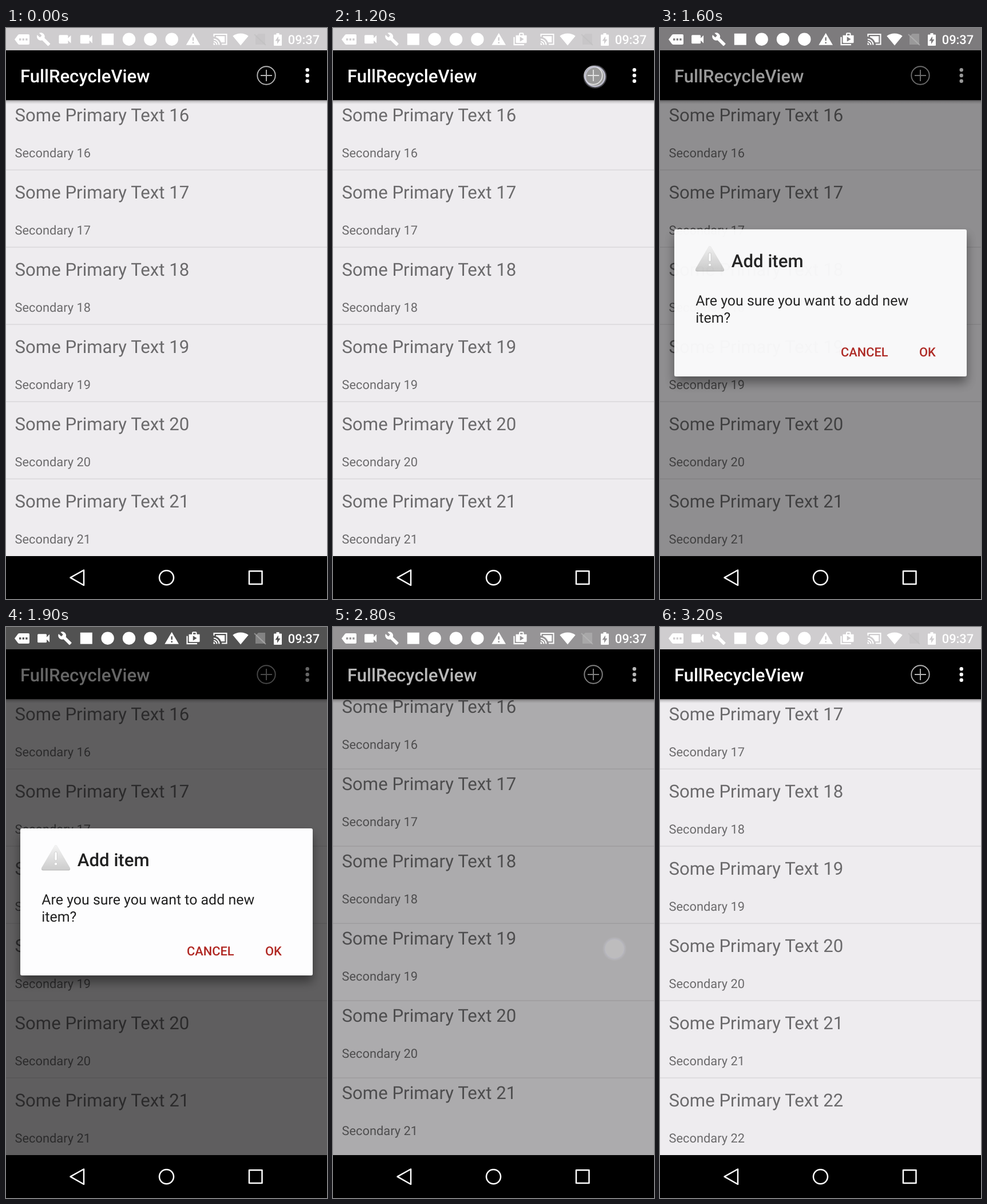
Write an HTML page that moves like this. It is 561x998 px and loops after 5100 ms.

```html
<!DOCTYPE html>
<html lang="en">
<head>
<meta charset="utf-8">
<title>List with add dialog</title>
<style>
  html, body { margin: 0; width: 100%; height: 100%; overflow: hidden; background: #000; }
  svg { display: block; width: 100%; height: 100%; }
  text { font-family: Roboto, sans-serif; text-rendering: geometricPrecision; white-space: pre; }
  .big { font-size: 31.17px; }
  .mid { font-size: 24.93px; }
  .small { font-size: 21.82px; }
  .medium { font-weight: 500; }
</style>
</head>
<body>
<svg viewBox="0 0 561 998">
  <defs>
    <linearGradient id="barShade" x2="0" y2="1">
      <stop stop-color="#000" stop-opacity=".42"/>
      <stop offset=".4" stop-color="#000" stop-opacity=".14"/>
      <stop offset="1" stop-color="#000" stop-opacity="0"/>
    </linearGradient>
    <linearGradient id="alertFill" x2="0" y2="1">
      <stop stop-color="#f2f2f2"/>
      <stop offset="1" stop-color="#cfcfcf"/>
    </linearGradient>
    <filter id="lift" x="-15%" y="-20%" width="130%" height="150%">
      <feDropShadow dx="0" dy="11" stdDeviation="9" flood-color="#000" flood-opacity=".42"/>
    </filter>
    <clipPath id="listArea"><path d="M0 126H561V923H0z"/></clipPath>

    <!-- Status icons, centred on 0,0 -->
    <g id="more"><path fill-rule="evenodd" d="M-13 0L-7-8Q-6-9-4.500-9H11Q13-9 13-7V7Q13 9 11 9H-4.500Q-6 9-7 8zM-5-1.700h3.400v3.400H-5zM.6-1.700H4v3.400H.6zM6.200-1.700h3.400v3.400H6.200z"/></g>
    <g id="camera"><path d="M-9-7.500H4Q5.500-7.500 5.500-6V-2L10.500-7V7L5.500 2V6Q5.500 7.500 4 7.500H-9Q-10.500 7.500-10.500 6V-6Q-10.500-7.500-9-7.500z"/></g>
    <g id="wrench"><path transform="scale(1.06) translate(-12 -12)" d="M22.700 19l-9.100-9.100c.9-2.300.4-5-1.500-6.900-2-2-5-2.400-7.400-1.300L9 6 6 9 1.600 4.700C.4 7.100.9 10.100 2.900 12.100c1.900 1.900 4.600 2.400 6.900 1.500l9.100 9.100c.4.4 1 .4 1.400 0l2.300-2.300c.5-.4.5-1.100.1-1.400z"/></g>
    <g id="block"><path d="M-10.500-10h21v20h-21z"/></g>
    <g id="disc"><circle r="11.200"/></g>
    <g id="warn"><path fill-rule="evenodd" d="M0-11L12.300 10H-12.300zM-1.200-3.500V2.500H1.200V-3.500zM-1.200 4.800V7.200H1.200V4.800z"/></g>
    <g id="bag">
      <path d="M-10.500-4V9.500H7" fill="none" stroke="#fff" stroke-width="2.200"/>
      <path fill-rule="evenodd" d="M-7.500-7H-2V-9.500Q-2-11.500 0-11.500H4.500Q6.500-11.500 6.500-9.500V-7H11.500V5Q11.500 6.500 10 6.500H-6Q-7.500 6.500-7.500 5zM0-9.500V-7H4.500V-9.500zM-.3-4.500V4L6.500-.3z"/>
    </g>
  </defs>

  <path fill="#eeecef" d="M0 0H561V998H0z"/>
  <g clip-path="url(#listArea)">
    <g id="lines" fill="#000" fill-opacity=".11"></g>
    <g id="rows" fill="#000" fill-opacity=".55"></g>
  </g>
  <path fill="url(#barShade)" d="M0 126H561V133H0z"/>
  <path fill="#cfcdcf" d="M0 0H561V39H0z"/>
  <path d="M0 39H561V126H0z"/>
  <text class="big medium" x="24.900" y="95" fill="#fff">FullRecycleView</text>
  <g fill="none" stroke="#b4b4b4" stroke-width="1.900">
    <circle cx="455" cy="83" r="15.700"/>
    <path d="M445 83H465M455 73V93"/>
  </g>
  <g fill="#fff">
    <circle cx="526.700" cy="73.300" r="3.200"/>
    <circle cx="526.700" cy="83" r="3.200"/>
    <circle cx="526.700" cy="92.700" r="3.200"/>
  </g>

  <path id="dim" d="M0 0H561V923H0z"/>

  <g fill="#fff">
    <g id="trayA"></g>
    <g id="trayB"></g>
    <use href="#more" x="28" y="20"/>
    <g fill="none" stroke="#fff" stroke-width="2.100">
      <path d="M363.500 15V11H385.500V28.500H377M363 19.500A10 10 0 0 1 372.500 29.500M363 23.700A6 6 0 0 1 368.500 29.500"/>
    </g>
    <path d="M362.500 26.300A3.400 3.400 0 0 1 365.600 29.500H362.500zM367 14.200H382.300V25.200H376Q373 18 367 16.200z"/>
    <path d="M410 30.500L396.300 14Q402 9.500 410 9.500T423.700 14z"/>
    <g stroke="#bebebe" stroke-opacity=".55" fill="#bebebe" fill-opacity=".45">
      <path stroke="none" d="M441 10H453V29H436V15z"/>
      <path stroke-width="2" d="M434 11L454 30"/>
    </g>
    <path fill-rule="evenodd" d="M472.500 9H477.500V11.500H481Q482 11.500 482 12.500V30Q482 31 481 31H469Q468 31 468 30V12.500Q468 11.500 469 11.500H472.500zM476 14.500L470.500 22.500H474V28L479.500 20H476z"/>
    <text class="small medium" x="492.800" y="27.700">09:37</text>
  </g>

  <path d="M0 923H561V998H0z"/>
  <g fill="none" stroke="#fff" stroke-width="2.500" stroke-linejoin="round">
    <path d="M112.500 960.700L136 947.500V974z"/>
    <circle cx="280.500" cy="960.700" r="12.500"/>
    <path d="M425 949.200H447.500V972H425z"/>
  </g>

  <g id="dialog">
    <rect x="25" y="352" width="511" height="257" rx="3" fill="#fdfdfe" filter="url(#lift)"/>
    <path d="M87 384L109.500 423H64.500z" fill="#bdbdbd" stroke="#bdbdbd" stroke-width="5" stroke-linejoin="round"/>
    <path d="M87 383.500L109.300 421.500H64.700z" fill="url(#alertFill)" stroke="url(#alertFill)" stroke-width="5" stroke-linejoin="round"/>
    <g fill="#fff" stroke="#c4c4c4" stroke-width=".8">
      <rect x="84.700" y="393" width="4.600" height="15" rx="2"/>
      <circle cx="87" cy="414" r="2.700"/>
    </g>
    <g fill="#000" fill-opacity=".87">
      <text class="big medium" x="124.700" y="418">Add item</text>
      <text class="mid" x="62.300" y="485">Are you sure you want to add new</text>
      <text class="mid" x="62.300" y="514.500">item?</text>
    </g>
    <g fill="#b02722">
      <text class="small medium" x="316" y="573.700">CANCEL</text>
      <text class="small medium" x="452.900" y="573.700">OK</text>
    </g>
  </g>

  <g id="touch">
    <circle r="18" fill="none" stroke="#dcdce6" stroke-opacity=".3" stroke-width="5"/>
    <circle r="17.300" fill="#fff" fill-opacity=".6" stroke="#c9c9dc" stroke-opacity=".85" stroke-width="2.200"/>
  </g>
</svg>

<script>
const LOOP = 5100, STEP = 100, PITCH = 135, FIRST = 16, LAST = 22;
const $ = id => document.getElementById(id);
const clamp = v => Math.min(1, Math.max(0, v));
const ramp = (t, start, length) => clamp((t - start) / length);
const fade = (el, value) => el.setAttribute('opacity', value);
const move = (el, x, y) => el.setAttribute('transform', `translate(${x} ${y})`);

function add(parent, tag, attrs, text = '') {
  const el = document.createElementNS('http://www.w3.org/2000/svg', tag);
  for (const key in attrs) el.setAttribute(key, attrs[key]);
  el.textContent = text;
  return parent.appendChild(el);
}

function fillTray(tray, names) {
  names.split(' ').forEach((name, i) =>
    add(tray, 'use', { href: '#' + name, x: 65.600 + i * 37.350, y: 19.700 }));
}

for (let i = 0; i < 5; i++)
  add($('lines'), 'rect', { x: 0, y: 247.500 + i * PITCH, width: 561, height: 1.200 });

let lastRow;
for (let n = FIRST; n <= LAST; n++) {
  const y = (n - FIRST) * PITCH;
  lastRow = add($('rows'), 'g', {});
  add(lastRow, 'text', { class: 'big', x: 15.600, y: y + 163 }, `Some Primary Text ${n}`);
  add(lastRow, 'text', { class: 'small', x: 15.600, y: y + 225.700 }, `Secondary ${n}`);
}

fillTray($('trayA'), 'wrench camera camera block disc disc disc warn');
fillTray($('trayB'), 'camera wrench block disc disc disc warn bag');

function draw(time) {
  const t = Math.floor(time % LOOP / STEP) * STEP;

  const swap = ramp(t, 0, 200);
  fade($('trayA'), 1 - swap);
  fade($('trayB'), swap);

  const closing = t >= 2600;
  const opened = 1 - (1 - ramp(t, 1400, 250)) ** 2;
  fade($('dialog'), closing ? 1 - ramp(t, 2640, 150) : opened);
  fade($('dim'), 0.6 * (ramp(t, 1400, 300) - ramp(t, 2640, 300)));

  // Rows slide up, then the new one fades in
  const slide = 0.5 - 0.5 * Math.cos(Math.PI * ramp(t, 2750, 250));
  move($('rows'), 0, -PITCH * slide);
  fade(lastRow, ramp(t, 3000, 120));

  const pressed = closing ? 2600 : 1200;
  move($('touch'), closing ? 492 : 458, closing ? 562.500 : 85);
  fade($('touch'), t < pressed ? 0 : 1 - ramp(t, pressed, 300));
}

let began;
function tick(now) {
  began ??= now;
  draw(now - began);
  requestAnimationFrame(tick);
}
draw(0);
requestAnimationFrame(tick);
</script>
</body>
</html>
```
